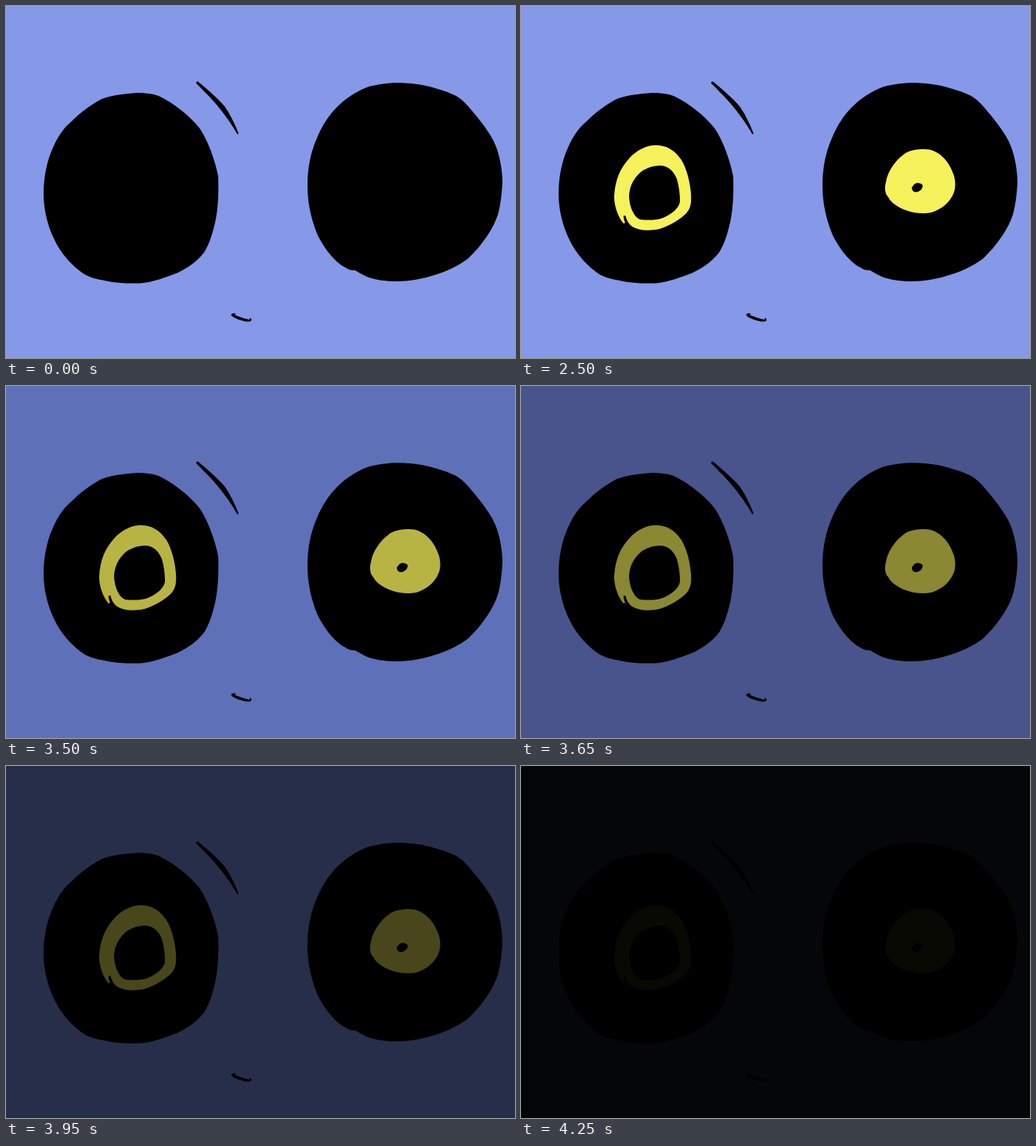
Animation of 650 by 450 pixels, one loop 5850 ms. Source, as an HTML page:

```html
<!DOCTYPE html>
<html lang="en">
<head>
<meta charset="utf-8">
<title>Wide eyes</title>
<style>
  html, body { margin: 0; width: 100%; height: 100%; overflow: hidden; background: #000; }
  svg { display: block; width: 650px; height: 450px; }

  .sky, .yellow, .glint, .pupil { animation: 5850ms step-end infinite; }
  .sky { animation-name: sky; }
  .yellow { animation-name: yellow; fill-rule: evenodd; }
  .glint { animation-name: glint; }
  .pupil { animation-name: drop; transform-box: fill-box; transform-origin: center; }

  /* Night falls in even steps */
  @keyframes sky {
    0% { fill: #8599e8; }
    55.55% { fill: #7b90de; }
    58.11% { fill: #6c80cb; }
    59.82% { fill: #5e70b8; }
    60.68% { fill: #5362a2; }
    62.39% { fill: #48548b; }
    64.1% { fill: #3d4775; }
    65.81% { fill: #313a5f; }
    67.52% { fill: #262e49; }
    68.37% { fill: #1b2134; }
    70.08% { fill: #10141f; }
    72.64%, 100% { fill: #04060a; }
  }
  @keyframes yellow {
    0% { fill: #f6f25c; }
    55.55% { fill: #ece85a; }
    58.11% { fill: #d2ce4f; }
    59.82% { fill: #b8b444; }
    60.68% { fill: #a29e3c; }
    62.39% { fill: #8b8833; }
    64.1% { fill: #75732b; }
    65.81% { fill: #5f5c23; }
    67.52% { fill: #49461b; }
    68.37% { fill: #343213; }
    70.08% { fill: #1e1d0b; }
    72.64%, 100% { fill: #090903; }
  }

  /* The pupils roll in from the top, overshoot and settle */
  @keyframes glint {
    0% { opacity: 0; }
    36.75% { opacity: 1; }
    38.46%, 100% { opacity: 0; }
  }
  @keyframes drop {
    0% { opacity: 0; transform: none; }
    38.46% { opacity: 1; transform: translateY(-50px) scale(.92, .65); }
    40.17% { opacity: 1; transform: translateY(14px) scale(1, 1.02); }
    41.88% { opacity: 1; transform: translateY(6px); }
    42.73%, 100% { opacity: 1; transform: none; }
  }
</style>
</head>
<body>
<svg viewBox="0 0 650 450">
  <rect class="sky" width="650" height="450"/>

  <!-- eyes -->
  <path d="M168 111C178 111 187 112 195 115C216 125 235 141 247 156C257 170 267 197 271 218C272 245 270 268 265 285C262 297 258 307 253 315C243 328 228 338 214 343C198 349 183 354 171 354.5C155 355 139 354 126 351C116 349 110 348 102 344C87 335 70 317 62 299C54 283 48 262 48 240C48 217 53 196 60 181C66 167 73 157 81 150C95 136 110 125 122 119C135 114 152 112 168 111Z"/>
  <path d="M482 99.5C493 98 505 98 517 99C538 101 561 108 575 115C585 121 592 130 601 141C612 155 622 168 627 183C631 195 634 211 634 226C633 243 631 257 628 267C623 283 609 305 590 323C578 332 560 341 537 347C525 350 511 352 500 352C486 352 472 350 463 347C456 344 451 341 446 338C441 338 437 337 433 334C420 328 406 309 398 293C389 272 385 250 385 229C385 207 389 187 397 169C404 152 413 139 421 131C432 119 447 110 456 106C464 102 473 101 482 99.5Z"/>

  <!-- brow and mouth -->
  <path d="M243 97L245 96.5C258 107 271 119 279 128C286 138 292 150 297 163L295.5 164C288 151 281 141 272 130C263 119 252 108 243 99Z"/>
  <path d="M287.5 395C288 393 290 392.5 293 393L292.5 395C299 398 306 400 311 401L311.5 398.5L313.5 400L313 403C308 404.5 300 402 295 400C291 398 288 397 287.5 395Z"/>

  <g class="yellow">
    <g class="glint">
      <path d="M136 124L143 123.5C150 120 170 119 178 121L187 126C180 130 168 132 157 130C148 129 141 127 136 124Z"/>
      <path d="M486 111C495 107 515 109 524 112L535 116C530 120 520 120 508 118C498 117 491 115 486 111Z"/>
    </g>
    <path class="pupil" d="M172 178C186 178 196 184 205 197C212 209 216 226 217 240C218 253 216 259 211 265C203 273 190 281 177 285C163 288 150 287 142 282C138 279 135 275 133.5 268L131 268C131 272 132 275 133 277L131 278C124 270 119 256 119 244C120 222 127 207 138 195C148 184 160 178 172 178Z
      M177 204C188 204 195 211 199 221C202 231 203 241 203 250C202 258 193 266 181 271C173 274 162 274 152 273C143 269 138 254 138 242C139 228 146 217 156 210C163 206 170 204 177 204Z"/>
    <path class="pupil" d="M515 183C532 183 546 196 553 217C555 225 555 232 553 238C548 251 537 260 524 264C508 267 489 263 475 252C471 248 470 246 468 243C465 240 464 232 466 225C469 208 481 195 491 188C498 184 507 183 515 183Z
      M502 228C505 225 511 226 513 229C513 233 511 236 507 237.5C502 239 499 236 499 232Z"/>
  </g>
</svg>
</body>
</html>
```
